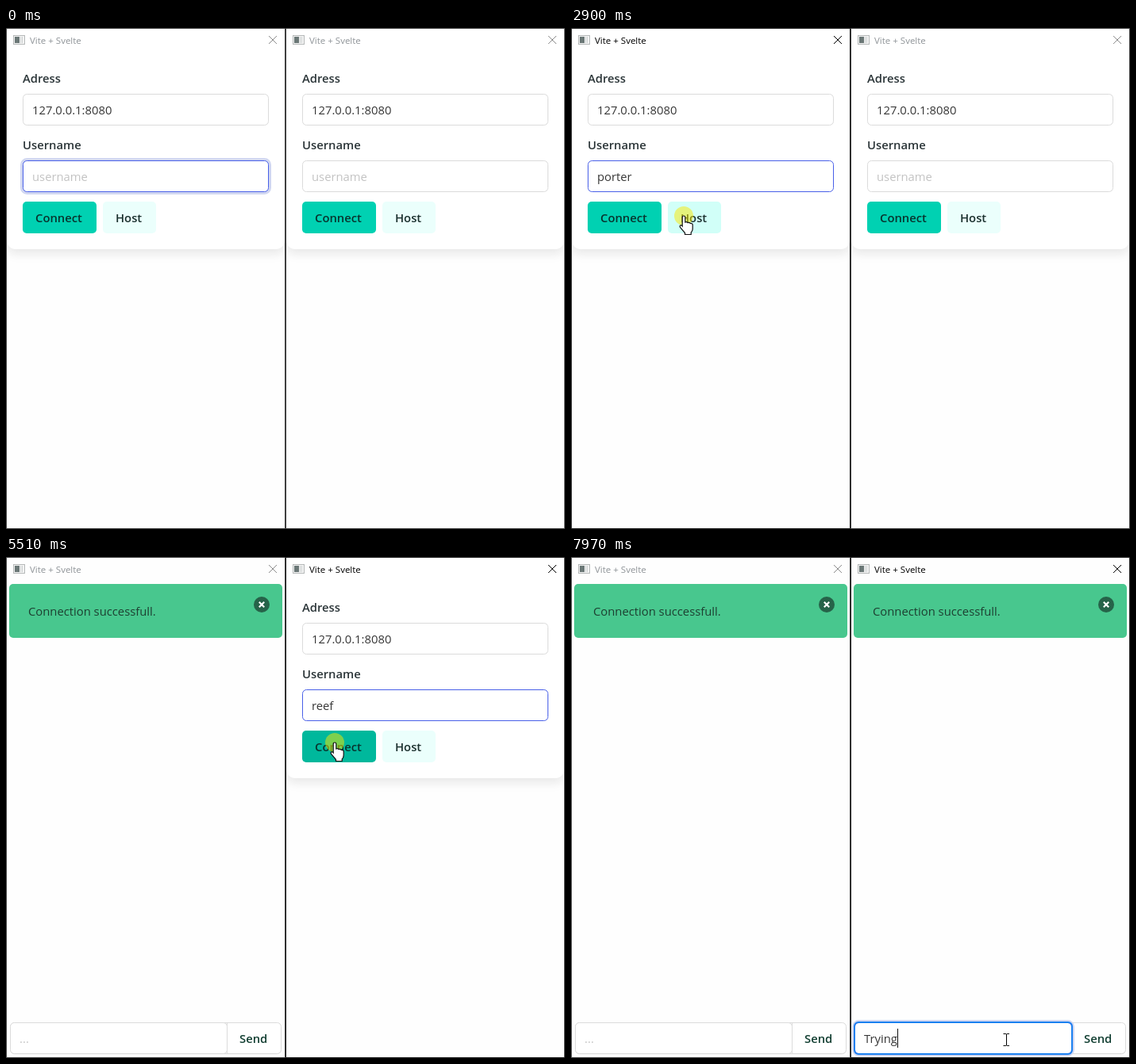
Animation of 704x632 px, one loop 8 s. Source, as an HTML page:

```html
<!DOCTYPE html>
<html lang="en">
<head>
<meta charset="utf-8">
<title>Chat demo</title>
<style>
  html, body { margin: 0; width: 100%; height: 100%; overflow: hidden; background: #fefefe; }
  #stage { display: block; width: 704px; height: 632px; }
  text { font: 14.8px "Open Sans", "Noto Sans", sans-serif; fill: #363636; white-space: pre; }
  .strong { font-weight: 600; fill: #2b3538; }
  .title { font-size: 11.5px; }
  .card { fill: #fff; filter: drop-shadow(0 6px 6px rgba(10, 10, 10, .09)); }
  .halo, .outline, .edge { fill: none; }
  .halo { stroke: #d1d7f1; stroke-width: 7; }
  .outline { stroke: #1a80f0; stroke-width: 2; }
  .edge { fill: #fff; stroke: #dbdbdb; }
</style>
</head>
<body>
<svg id="stage" viewBox="0 0 704 632"></svg>
<script>
const LOOP = 8000;
const FORM_Y = 167, CHAT_Y = 587;
const stage = document.getElementById('stage');

const label = (x, y, words, cls = '', extra = '') =>
  `<text x="${x}" y="${y}" class="${cls}" ${extra}>${words}</text>`;

const field = (name, x, y, w, hint) => `<g class="${name}">
  <rect class="halo" x="${x + .5}" y="${y + .5}" width="${w - 1}" height="39" rx="5"/>
  <rect class="edge" x="${x + .5}" y="${y + .5}" width="${w - 1}" height="39" rx="5"/>
  <rect class="outline" x="${x}" y="${y}" width="${w}" height="40" rx="5"/>
  ${label(x + 12, y + 26, hint, 'hint', 'style="fill:#c3c3c3"')}
  ${label(x + 12, y + 26, '', 'value')}
  <rect class="caret" y="${y + 8}" width="1" height="24" fill="#111"/></g>`;

const windowMarkup = (name, x) => `<svg id="${name}" x="${x}" width="352" height="632">
  <rect width="352" height="632" fill="#fefefe"/>
  <g class="form">
    <rect class="card" x="1" y="-20" width="350" height="299" rx="11"/>
    ${label(21, 69, 'Adress', 'strong')}
    <rect class="edge" x="21.5" y="83.5" width="309" height="39" rx="5"/>
    ${label(33, 109, '127.0.0.1:8080')}
    ${label(21, 153, 'Username', 'strong')}
    ${field('user', 21, FORM_Y, 310, 'username')}
    <rect class="connect" x="21" y="219" width="93" height="40" rx="5"/>
    ${label(37, 245, 'Connect', 'strong', 'style="fill:#08352f"')}
    <rect class="host" x="122" y="219" width="67" height="40" rx="5"/>
    ${label(138, 245, 'Host', 'strong', 'style="fill:#1b302e"')}
  </g>
  <g class="chat">
    <rect x="4" y="34" width="344" height="68" rx="5" fill="#48c78e"/>
    ${label(28, 74, 'Connection successfull.', '', 'style="fill:#1d3f31"')}
    <circle cx="322" cy="60" r="10" fill="#266349"/>
    <path d="M318.8 56.8l6.4 6.4m0-6.4l-6.4 6.4" stroke="#fff" stroke-width="2.2"/>
    <rect x="5.5" y="588.5" width="341" height="39" rx="5" fill="#eee"/>
    <rect class="edge" x="5.5" y="587.5" width="341" height="39" rx="5"/>
    <path d="M278.5 588v39" stroke="#dbdbdb"/>
    ${label(294, 613, 'Send', 'strong', 'style="fill:#123f32"')}
    ${field('message', 5, CHAT_Y, 274, '...')}
  </g>
  <rect x="9.5" y="9.5" width="14" height="11" fill="#f4f4f4" stroke="#b5b8b8"/>
  <path d="M11 11h6v8h-6z" fill="#6b7877"/>
  <path d="M18.5 11v8m2-8v8" stroke="#ccd0d0"/>
  ${label(30, 20, 'Vite + Svelte', 'title')}
  <path class="close" d="M331 10l10 10m0-10l-10 10" fill="none"/>
  <rect class="frame" x=".5" y=".5" width="351" height="631" fill="none"/>
</svg>`;

stage.innerHTML = windowMarkup('left', 0) + windowMarkup('right', 352) + `
  <circle id="press" r="12" fill="rgba(250,232,0,.5)"/>
  <g id="pointer">
    <path class="arrow" d="M.5.5V16.5L4.2 13 6.8 19 9.3 18 6.8 12H12Z" fill="#fff" stroke="#111"/>
    <path class="beam" d="M-3.5-7.5H-1Q0-7.5 .5-7 1-7.5 2-7.5H4M.5-7V7M-3.5 7.5H-1Q0 7.5 .5 7 1 7.5 2 7.5H4"
      fill="none" stroke="#000"/>
    <path class="hand" d="M-1.8 1.8a1.8 1.8 0 0 1 3.6 0V8q2-1 3.2.6 2-.8 3.2.8 2.8-.4 3 2V16q0 3-2 5V23.5H1.5V21.5L-4.5 14.5q-1-2 .7-2.7 1-.2 2 1.2Z"
      fill="#fff" stroke="#111" stroke-width="1.2"/>
  </g>`;

// Pointer stops: time, x, y
const route = [
  [100, 598, 612], [380, 420, 400], [670, 168, 194], [810, 170, 195],
  [2280, 170, 195], [2700, 147, 237], [2840, 142, 237],
  [3110, 142, 237], [3470, 425, 270], [3610, 425, 270], [3900, 495, 179], [4090, 495, 175],
  [4890, 495, 175], [5400, 414, 234],
  [5680, 414, 234], [5930, 551, 604], [6100, 551, 604], [6430, 548, 609], [LOOP, 548, 609]
];
const presses = [[740, 940], [2830, 3040], [3950, 4160], [5440, 5650], [6500, 6710]];

const typing = {
  left: { words: 'porter', times: [1210, 1410, 1480, 1750, 1850, 1950] },
  right: { words: 'reef', times: [4490, 4560, 4620, 4690] },
  message: { words: 'Trying', times: [7510, 7630, 7740, 7860, 7970, 7970] }
};
const typed = ({ words, times }, t) => words.slice(0, times.filter(at => at <= t).length);
const within = (t, [from, to]) => t >= from && t < to;

function pointerAt(t) {
  const i = route.findIndex(stop => stop[0] > t);
  if (i < 1) return null;
  const [a, b] = [route[i - 1], route[i]];
  const k = (t - a[0]) / (b[0] - a[0]);
  return { x: a[1] + (b[1] - a[1]) * k, y: a[2] + (b[2] - a[2]) * k };
}

// What lies under the pointer inside one window
function hit(x, y, chat) {
  const inside = (l, top, r, bottom) => x >= l && x <= r && y >= top && y <= bottom;
  if (chat) return inside(5, 587, 278, 627) ? 'text' : inside(278, 587, 347, 627) ? 'send' : '';
  if (inside(21, 83, 331, 123) || inside(21, 167, 331, 207)) return 'text';
  return inside(21, 219, 114, 259) ? 'connect' : inside(122, 219, 189, 259) ? 'host' : '';
}

const show = (el, on) => el.setAttribute('visibility', on ? 'inherit' : 'hidden');

function drawField(box, mode, words, caret) {
  const part = name => box.querySelector('.' + name);
  show(part('halo'), mode === 'soft' || mode === 'focus');
  show(part('outline'), mode === 'focus');
  part('edge').style.stroke = mode === 'idle' ? '#dbdbdb' : '#485fe8';
  show(part('hint'), !words);
  const value = part('value');
  value.textContent = words;
  const start = +value.getAttribute('x');
  part('caret').setAttribute('x', Math.round(start + (words ? value.getComputedTextLength() : 0)));
  show(part('caret'), caret);
}

function drawWindow(name, s) {
  const win = document.getElementById(name);
  const part = cls => win.querySelector('.' + cls);
  part('title').style.fill = s.active ? '#000' : '#8f9498';
  part('close').style.stroke = s.active ? '#000' : '#8c8c8c';
  part('frame').style.stroke = s.active ? '#1f1f1f' : '#3f3f3f';
  show(part('form'), !s.chat);
  show(part('chat'), s.chat);
  const shade = (button, idle, hover, down) =>
    part(button).style.fill = s.over !== button ? idle : s.down ? down : hover;
  shade('connect', '#00d1b2', '#00c4a7', '#00b89c');
  shade('host', '#ebfffc', '#defffa', '#d1fff8');
  drawField(part('user'), s.mode, s.user, s.userCaret && !s.chat);
  drawField(part('message'), s.messageMode, s.message, s.messageCaret && s.chat);
}

function draw(t) {
  const spot = pointerAt(t);
  const down = presses.some(span => within(t, span));
  const chat = { left: t >= 3110, right: t >= 5650 };
  const side = spot && spot.x < 352 ? 'left' : 'right';
  const over = spot ? hit(spot.x - (side === 'right' ? 352 : 0), spot.y, chat[side]) : '';
  const overIn = name => name === side ? over : '';
  const rightActive = t >= 3950;

  drawWindow('left', {
    active: t >= 740 && !rightActive, chat: chat.left, over: overIn('left'), down,
    mode: t < 740 ? 'soft' : t < 2830 ? 'focus' : 'press',
    user: typed(typing.left, t), userCaret: within(t, [740, 2830]),
    messageMode: 'idle', message: '', messageCaret: false
  });
  drawWindow('right', {
    active: rightActive, chat: chat.right, over: overIn('right'), down,
    mode: !rightActive ? 'idle' : t < 5440 ? 'focus' : 'press',
    user: typed(typing.right, t), userCaret: within(t, [4490, 5440]),
    messageMode: t < 6500 ? 'idle' : 'focus',
    message: typed(typing.message, t),
    messageCaret: within(t, [6500, 6980]) || t >= 7510
  });

  const pointer = document.getElementById('pointer');
  const press = document.getElementById('press');
  show(pointer, !!spot);
  show(press, down);
  if (!spot) return;
  const place = `translate(${Math.round(spot.x)} ${Math.round(spot.y)})`;
  pointer.setAttribute('transform', place);
  press.setAttribute('transform', place);
  const shape = over === 'text' ? 'beam' : over ? 'hand' : 'arrow';
  for (const el of pointer.children) el.style.display = el.classList.contains(shape) ? '' : 'none';
}

const begin = performance.now();
function tick() {
  draw((performance.now() - begin) % LOOP);
  requestAnimationFrame(tick);
}
tick();
</script>
</body>
</html>
```
